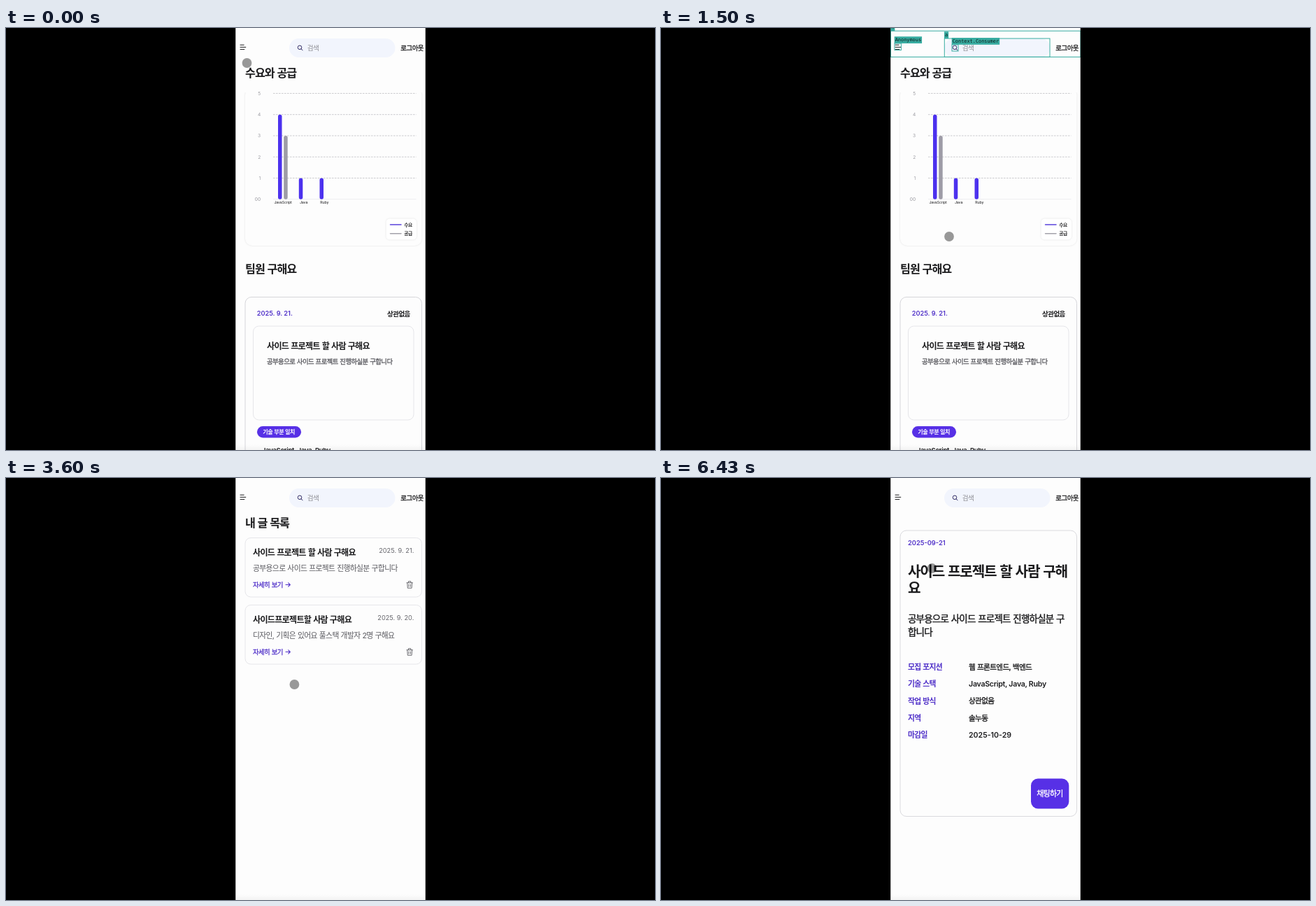
An HTML page that plays this animation: 928 px wide and 603 px high, repeating every 6.57 s.

```html
<!DOCTYPE html>
<html lang="ko">
<head>
<meta charset="utf-8">
<title>모바일 화면 데모</title>
<style>
  html, body { margin: 0; width: 100%; height: 100%; overflow: hidden; background: #000; }
  svg { display: block; width: 928px; height: 603px; }
  text { font-family: Inter, "Noto Sans CJK KR", "Noto Sans CJK", sans-serif; white-space: pre; }
  .ko { letter-spacing: -.06em; word-spacing: .05em; }
  .latin { letter-spacing: -.025em; }
  .medium { stroke-width: .03em; }
  .mono { font: 6.9px "DejaVu Sans Mono", monospace; }
  .brand { font: 900 29px Lato, sans-serif; }
  .soft { filter: drop-shadow(0 .8px 1px rgba(0, 0, 0, .12)); }
</style>
</head>
<body>
<svg id="stage" viewBox="0 0 928 603" xmlns="http://www.w3.org/2000/svg"></svg>
<script>
const LOOP = 6570;
const INK = '#1c1c1e', GRAY = '#58585e', VIOLET = '#5730e6', LINK = '#5132c9', PAPER = '#fdfdfd';

// Text placed by its vertical centre; medium Hangul is regular with a hairline stroke
function text(x, cy, size, str, { fill = INK, weight = 400, anchor = 'start' } = {}) {
  const korean = /[가-힣]/.test(str);
  const medium = korean && weight === 500;
  const style = (korean ? 'ko' : /[a-z]/.test(str) ? 'latin' : '') + (medium ? ' medium' : '');
  const y = cy + size * (korean ? .375 : .36);
  return `<text x="${x}" y="${y}" font-size="${size}" font-weight="${medium ? 400 : weight}" fill="${fill}"
    text-anchor="${anchor}" class="${style}"${medium ? ` stroke="${fill}"` : ''}>${str}</text>`;
}

function box(x1, y1, x2, y2, r, attrs) {
  return `<rect x="${x1}" y="${y1}" width="${x2 - x1}" height="${y2 - y1}" rx="${r}" ${attrs}/>`;
}

const outline = color => `fill="${PAPER}" stroke="${color}"`;
const path = (d, color, width = 1) =>
  `<path d="${d}" fill="none" stroke="${color}" stroke-width="${width}" stroke-linecap="round" stroke-linejoin="round"/>`;
const heading = (cy, str) => text(342, cy, 16.2, str, { weight: 700 });

function header() {
  return path('M335 24.2h5.2M335 27.4h7.8M335 30.6h5.8', INK, 1)
    + box(405, 15, 556.5, 42, 13.5, 'fill="#f2f5fd"')
    + '<circle cx="420" cy="27.8" r="2.8" fill="none" stroke="#2b2560" stroke-width=".95"/>'
    + path('M422.1 29.9l2 2', '#2b2560', 1)
    + text(430.7, 28.5, 9.6, '검색', { fill: '#8c8c93' })
    + text(564.3, 28.5, 9.5, '로그아웃', { weight: 500 });
}

function chart() {
  const level = v => 244.7 - v * 30.25;
  let out = box(342, 86, 594.5, 311, 10, `fill="${PAPER}" class="soft"`)
    + box(340, 80, 597, 92, 0, `fill="${PAPER}"`);
  for (let v = 0; v <= 5; v++) {
    const style = v ? 'stroke="#cbcbcf" stroke-dasharray="2.6 1.4"' : 'stroke="#ededf0"';
    out += `<line x1="382" x2="586.5" y1="${level(v)}" y2="${level(v)}" ${style}/>`
      + text(364.2, level(v), 6.6, String(v || '00'), { fill: '#9a9aa0', anchor: 'end' });
  }
  const bar = (x, v, fill) => box(x, level(v), x + 5.5, level(0), 2.6, `fill="${fill}"`);
  out += bar(389, 4, '#4c31ee') + bar(397.2, 3, '#9d9ba6')
    + bar(418.8, 1, '#4c31ee') + bar(448.5, 1, '#4c31ee');
  ['JavaScript', 'Java', 'Ruby'].forEach((name, i) => {
    out += text(396 + i * 29.6, 248.8, 5.3, name, { anchor: 'middle' });
  });
  out += box(543.5, 272.5, 587, 302.5, 5, 'fill="#fff" class="soft"');
  [['수요', '#5a43dc'], ['공급', '#a3a2aa']].forEach(([name, color], i) => {
    const y = 281 + i * 12.8;
    out += path(`M549.5 ${y}h15.5`, color, 1.5) + text(569.2, y, 6.8, name, { weight: 500 });
  });
  return out;
}

function dashboard() {
  return chart()
    + heading(64, '수요와 공급')
    + heading(343.5, '팀원 구해요')
    + box(342, 384.5, 594.5, 640, 9, outline('#d6d6da'))
    + text(358.7, 408, 9.2, '2025. 9. 21.', { fill: LINK, weight: 600 })
    + text(577.8, 408, 9.5, '상관없음', { weight: 600, anchor: 'end' })
    + box(353.5, 426, 583, 560, 8, outline('#e6e6ea'))
    + text(373, 454.3, 12.1, '사이드 프로젝트 할 사람 구해요', { weight: 600 })
    + text(373, 476.3, 9.4, '공부용으로 사이드 프로젝트 진행하실분 구합니다', { fill: GRAY, weight: 500 })
    + box(359, 569, 422, 585.5, 8.2, `fill="${VIOLET}"`)
    + text(367.3, 577.3, 8.1, '기술 부분 일치', { fill: '#fff', weight: 600 })
    + text(366, 603.4, 9.4, 'JavaScript, Java, Ruby', { weight: 600 });
}

function postCard(top, title, date, summary) {
  const foot = top + 67;
  return box(342, top, 594.5, top + 84.5, 8, outline('#e6e6ea'))
    + text(353, top + 21, 12.1, title, { weight: 600 })
    + text(583.3, top + 18.2, 9.2, date, { fill: '#66666c', anchor: 'end' })
    + text(353, top + 43.6, 10.8, summary, { fill: GRAY })
    + text(353, foot, 9.4, '자세히 보기', { fill: LINK, weight: 500 })
    + path(`M400 ${foot}h6.3m-2.6-2.6l2.6 2.6l-2.6 2.6`, LINK, 1.1)
    + path(`M573 ${foot - 2.8}h8.4M575.5 ${foot - 3}v-1.8h3.4v1.8M573.8 ${foot - 2.6}l.5 7.4h5.8l.5-7.4M576 ${foot - .5}v3.2M578.4 ${foot - .5}v3.2`, '#606066', .9);
}

function list() {
  return heading(64, '내 글 목록')
    + postCard(85.5, '사이드 프로젝트 할 사람 구해요', '2025. 9. 21.', '공부용으로 사이드 프로젝트 진행하실분 구합니다')
    + postCard(181.5, '사이드프로젝트할 사람 구해요', '2025. 9. 20.', '디자인, 기획은 있어요 풀스택 개발자 2명 구해요');
}

function detail() {
  const rows = [['모집 포지션', '웹 프론트엔드, 백엔드'], ['기술 스택', 'JavaScript, Java, Ruby'],
    ['작업 방식', '상관없음'], ['지역', '솔누동'], ['마감일', '2025-10-29']];
  return box(342, 75, 594.5, 483.5, 9, outline('#dadade'))
    + text(353, 93, 9.3, '2025-09-21', { fill: LINK, weight: 600 })
    + text(353, 133, 20.2, '사이드 프로젝트 할 사람 구해', { weight: 600 })
    + text(353, 157.5, 20.2, '요', { weight: 600 })
    + text(353, 201, 13.5, '공부용으로 사이드 프로젝트 진행하실분 구', { weight: 500 })
    + text(353, 220, 13.5, '합니다', { weight: 500 })
    + rows.map(([name, value], i) => {
      const y = 269.7 + i * 24.4;
      const weight = /[가-힣]/.test(value) ? 500 : 600;
      return text(353, y, 10.8, name, { fill: LINK, weight: 600 }) + text(440, y, 10.6, value, { weight });
    }).join('')
    + box(529, 429.5, 583.3, 472.5, 10, `fill="${VIOLET}"`)
    + text(537.2, 451, 10.9, '채팅하기', { fill: '#fff', weight: 500 });
}

function menu() {
  const icons = [
    '<path d="M-4.6 .2L0-4.2L4.6 .2H3.2V4H1V1.2H-1V4H-3.2V.2Z" fill="#fff"/>',
    '<circle cx="-1" cy="-1" r="2.6" fill="none" stroke="#111"/>' + path('M1 1l2.8 2.8', '#111', 1.1),
    '<path d="M-5.2 3.6V2.4C-5.2-.2 2.2-.2 2.2 2.4V3.6Z" fill="#111"/><circle cx="-1.5" cy="-1.7" r="1.9" fill="#111"/>'
      + path('M1.6-3.2c1.6 .3 1.6 2.6 0 3M3.6 .9c.9 .6 1 1.5 1 2.5M3.9-2.4v2.6M2.7-1.1h2.5', '#111', .9),
    `<circle r="4.5" fill="#111"/><circle cy="-1.3" r="1.4" fill="${PAPER}"/><path d="M-2.6 2.2C-1.6 .6 1.6 .6 2.6 2.2C1.4 3.8-1.4 3.8-2.6 2.2Z" fill="${PAPER}"/>`,
    path('M-3.4 2.6h6.8M-2.5 2.4V-.8a2.5 2.6 0 0 1 5 0V2.4M0-3.6v-.5M-.6 4.2h1.2', '#111', 1)
  ];
  const names = ['대시보드', '팀 찾기', '팀원 찾기', '마이페이지', '내 글 목록'];
  return box(328, 0, 491, 603, 0, `fill="${PAPER}"`)
    + path('M335 27.5l6-8M335.5 19.5l6 8', '#66666a', 1)
    + text(341, 23.5, 13, '닫기', { fill: '#66666a' })
    + '<circle cx="360" cy="69" r="17" fill="#d3a0dc"/>'
    + '<text x="382" y="76" class="brand" fill="#5f45e6">Penuo</text>'
    + box(334.3, 104, 440, 142, 7, `fill="${VIOLET}"`)
    + names.map((name, i) => {
      const y = 123.2 + i * 43.2;
      return `<g transform="translate(350.5 ${y})">${icons[i]}</g>`
        + text(364, y, 10.8, name, { fill: i ? '#111' : '#fff', weight: 500 });
    }).join('');
}

// name, then outlined area: x1, y1, x2, y2
const markers = [
  ['n', 328.5, 4.2, 600, 41.4],
  ['Anonymous', 334, 22, 343.4, 31.6],
  ['a', 405.3, 15, 556, 41.4],
  ['Context.Consumer', 416, 23.8, 425, 33],
  ['f', 342, 53, 594.3, 122.7]
];

function markersSvg(count, hidden) {
  const color = count > 1 ? '#5ab19d' : '#38aca1';
  return markers.filter(([name]) => !hidden.includes(name)).map(([name, x1, y1, x2, y2]) => {
    const label = count > 1 ? `${name} x${count}` : name;
    return box(x1, y1, x2, y2, 0, `fill="none" stroke="${color}"`)
      + box(x1 - .3, y1 - 9.8, x1 + label.length * 4.154 + 1.7, y1, 0, `fill="${color}"`)
      + `<text x="${x1 + .7}" y="${y1 - 2.9}" class="mono" fill="#0c1f1d">${label}</text>`;
  }).join('');
}

const group = (id, content) => `<g id="${id}">${content}</g>`;
document.getElementById('stage').innerHTML = `
  <defs>
    <clipPath id="screen"><rect x="328" width="272" height="603"/></clipPath>
    <linearGradient id="edge" x2="0" y2="1"><stop stop-opacity="0"/><stop offset="1" stop-opacity=".04"/></linearGradient>
  </defs>
  <rect width="928" height="603"/>
  <g clip-path="url(#screen)">
    ${box(328, 0, 600, 603, 0, `fill="${PAPER}"`)}
    ${group('dashboard', dashboard())}${group('list', list())}${group('detail', detail())}
    ${header()}${group('menu', menu())}
    ${box(328, 595, 600, 603, 0, 'fill="url(#edge)"')}
    <circle id="cursor" r="6.9" fill-opacity=".4"/>
    ${group('menuMarks', markersSvg(1, ['n', 'f']))}
    ${group('headerMarks', markersSvg(1, ['f']))}
    ${group('listMarks', markersSvg(2, []))}
    ${box(328, -2, 600, 605, 0, 'fill="none" stroke="#000" stroke-opacity=".5"')}
  </g>`;

const el = id => document.getElementById(id);
const show = (id, on) => el(id).setAttribute('display', on ? 'inline' : 'none');
const clamp = v => Math.max(0, Math.min(1, v));
const smooth = v => v * v * (3 - 2 * v);

// time, x, y
const cursorKeys = [
  [0, 344.5, 50], [400, 345, 30], [700, 345, 30], [1200, 412, 298], [3500, 412, 298], [3600, 412.4, 295],
  [4200, 391.3, 149], [5200, 391.3, 149], [5300, 391, 146], [5400, 391, 141], [5800, 391, 141], [6430, 387.5, 129]
];

function cursorAt(t) {
  const i = Math.max(1, cursorKeys.findIndex(key => key[0] >= t));
  const [t0, x0, y0] = cursorKeys[i - 1], [t1, x1, y1] = cursorKeys[i];
  const k = smooth(clamp((t - t0) / (t1 - t0)));
  return [x0 + (x1 - x0) * k, y0 + (y1 - y0) * k];
}

// Visible from start, fading out between hold and end
const pulse = (t, start, hold, end) => t < start ? 0 : 1 - clamp((t - hold) / (end - hold));

function render(time) {
  const t = time >= 6430 ? 6430 : Math.min(6300, Math.floor(time / 100) * 100);
  const page = t < 1700 ? 'dashboard' : t < 6000 ? 'list' : 'detail';
  ['dashboard', 'list', 'detail'].forEach(id => show(id, id === page));

  show('menu', t > 300 && t < 1500);
  el('menu').setAttribute('transform', `translate(${-163 * (1 - smooth(clamp((t - 300) / 200)))} 0)`);

  const [x, y] = cursorAt(t);
  el('cursor').setAttribute('cx', x);
  el('cursor').setAttribute('cy', y);

  el('menuMarks').setAttribute('opacity', t < 1500 ? pulse(t, 400, 700, 1200) : 0);
  el('headerMarks').setAttribute('opacity',
    t >= 1500 && t < 1700 ? 1 : pulse(t, 5900, 6100, 6400));
  el('listMarks').setAttribute('opacity', pulse(t, 1700, 1900, 2100));
}

const begin = performance.now();
function tick() {
  render((performance.now() - begin) % LOOP);
  requestAnimationFrame(tick);
}
tick();
</script>
</body>
</html>
```
